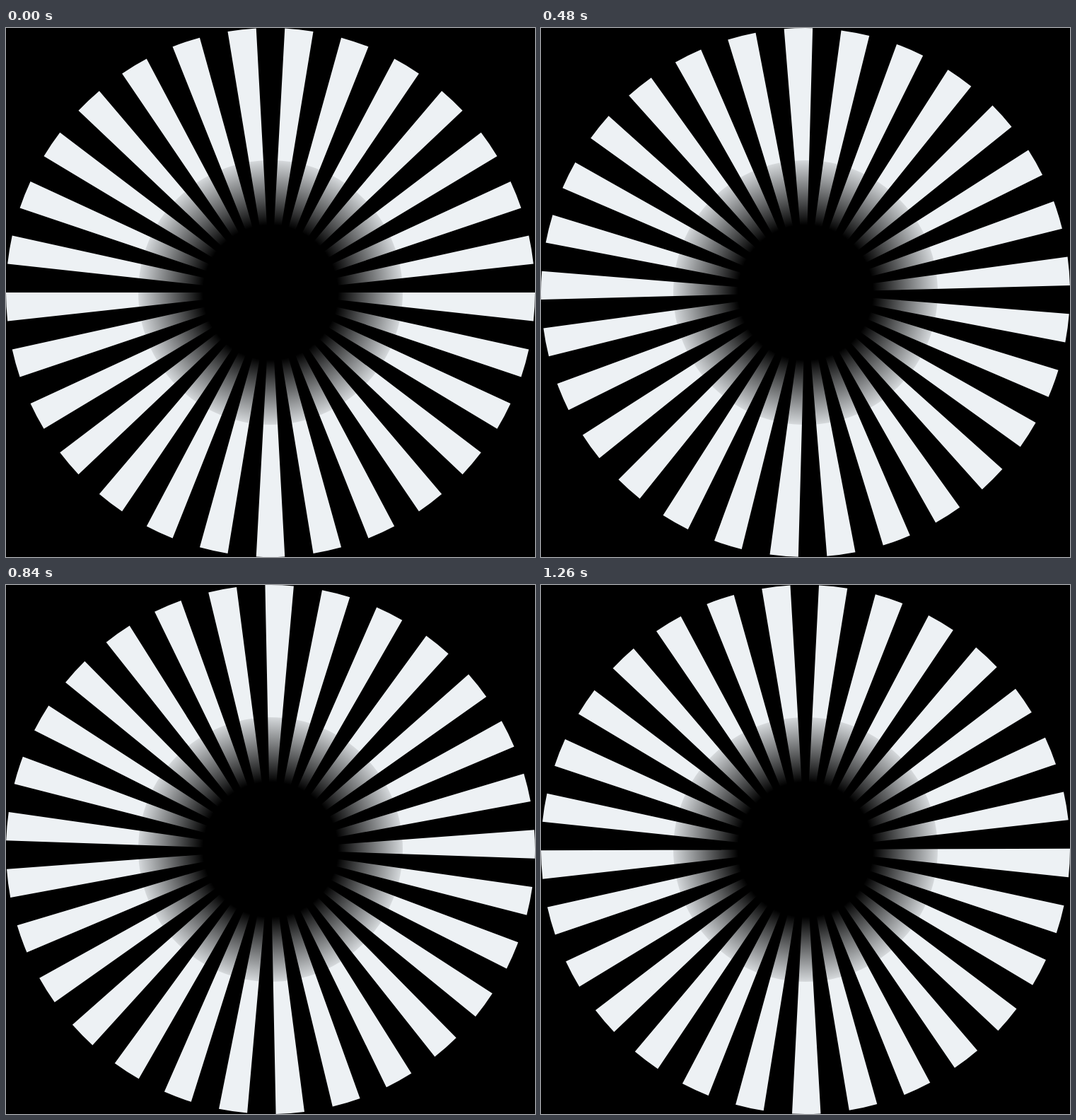
An HTML page that plays this animation: 748 px wide and 748 px high, repeating every 1290 ms.

```html
<!DOCTYPE html>
<html lang="en">
<head>
<meta charset="utf-8">
<title>Turning rays</title>
<style>
  html, body { margin: 0; width: 100%; height: 100%; overflow: hidden; background: #000; }
  svg { display: block; width: 100vw; height: 100vh; }
</style>
</head>
<body>
<svg viewBox="0 0 748 748">
  <defs>
    <radialGradient id="shade" gradientUnits="userSpaceOnUse" cx="374" cy="374" r="187">
      <stop offset="0.51" stop-color="#000"/>
      <stop offset="0.98" stop-color="#000" stop-opacity="0.14"/>
      <stop offset="1" stop-color="#000" stop-opacity="0.1"/>
    </radialGradient>
  </defs>
  <rect width="748" height="748" fill="#000"/>
  <path id="rays" fill="#edf1f4"/>
  <circle cx="374" cy="374" r="187" fill="url(#shade)"/>
</svg>
<script>
  const LOOP = 1290, STEP = 30;
  const COUNT = 29, R = 374;
  const SPEED = 0.0097; // degrees per ms, clockwise
  const PITCH = 2 * Math.PI / COUNT;
  const rays = document.getElementById('rays');

  const point = a => `${(R + R * Math.cos(a)).toFixed(3)} ${(R + R * Math.sin(a)).toFixed(3)}`;

  let d = '';
  for (let i = 0; i < COUNT; i++) {
    const a = i * PITCH;
    d += `M${R} ${R}L${point(a)}A${R} ${R} 0 0 1 ${point(a + PITCH / 2)}Z`;
  }
  rays.setAttribute('d', d);

  function draw(ms) {
    const t = Math.floor((ms % LOOP + 0.01) / STEP) * STEP;
    rays.setAttribute('transform', `rotate(${(t * SPEED).toFixed(4)} ${R} ${R})`);
  }

  function tick() {
    draw(performance.now());
    requestAnimationFrame(tick);
  }
  draw(0);
  requestAnimationFrame(tick);
</script>
</body>
</html>
```
